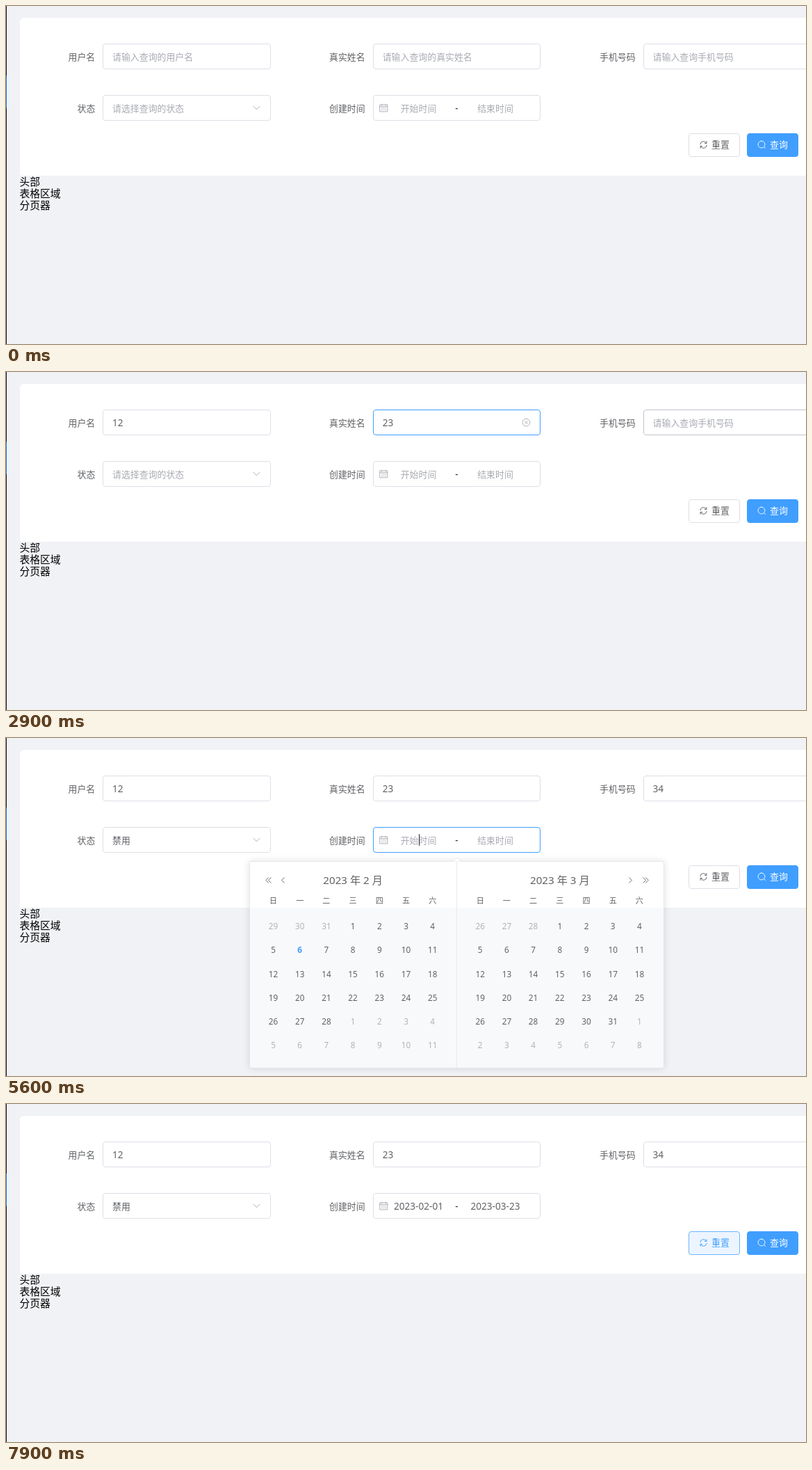
Animation, 1151 px wide and 486 px high, one loop 8 s. Source, as an HTML page:

```html
<!DOCTYPE html>
<html lang="zh-CN">
<head>
<meta charset="utf-8">
<title>查询表单</title>
<style>
  html, body { margin: 0; width: 100%; height: 100%; overflow: hidden; }
  #stage {
    position: relative; width: 1151px; height: 486px; overflow: hidden; background: #f0f2f5;
    font: 12.92px/1.3 "Noto Sans", "Noto Sans CJK SC", "Noto Sans CJK", sans-serif; color: #606266;
  }
  #stage div, #stage span, #stage svg { position: absolute; box-sizing: border-box; }
  span { white-space: pre; transform: translateY(-50%); }
  span.mid { transform: translate(-50%, -50%); }
  svg { fill: none; stroke: currentColor; stroke-linecap: round; stroke-linejoin: round; overflow: visible; }
  .card { background: #fff; border-radius: 6px 0 0 3px; }
  .edge { background: #10101f; }
  .mark { background: #1472e0; }
  .field { border: 1px solid #dcdfe6; border-radius: 4px; background: #fff; }
  .hint { color: #a8abb2; }
  .num { font-size: 13.6px; }
  .plain { font-size: 14.77px; color: #000; }
  .caret { width: 1px; height: 17px; background: #303133; }
  .button {
    display: flex; align-items: center; justify-content: center; gap: 5.5px;
    border: 1px solid #dcdfe6; border-radius: 4px; background: #fff; font-weight: 500;
  }
  #stage .button > * { position: static; transform: none; }
  .primary { background: #409eff; border-color: #409eff; color: #fff; }
  .popup {
    border-radius: 3px; transform-origin: 50% 0;
    box-shadow: 0 0 0 1px #e4e7ed, 0 0 11px 1px rgba(0, 0, 0, .12);
  }
  .tip {
    width: 9px; height: 9px; background: #fff; border: 1px solid #e4e7ed;
    transform: rotate(45deg); clip-path: polygon(0 0, 100% 0, 0 100%);
  }
  .menu { background: linear-gradient(#fff 5px, #f9f9f9 5px, #f7f7f7); }
  .picker { background: rgba(255, 255, 255, .55); }
  .line { background: #e9ebf0; }
  .title { font-size: 15.2px; }
  .day { font-size: 11.8px; }
  .week { font-size: 11.1px; }
  .other { color: #b0b3b9; }
  .today { color: #409eff; font-weight: 700; }
  .range { background: #f1f5fc; }
  .dot {
    width: 22px; height: 22px; border-radius: 50%; background: #409eff; color: #fff;
    text-align: center; line-height: 22px; transform: translate(-50%, -50%);
  }
</style>
</head>
<body>
<div id="stage"></div>
<script>
const LOOP = 8000;
const GREY = '#dcdfe6', HOVER = '#c0c4cc', BLUE = '#409eff';
const stage = document.getElementById('stage');

function add(tag, cls, x, y, parent = stage) {
  const el = document.createElement(tag);
  el.className = cls;
  el.style.left = x + 'px';
  el.style.top = y + 'px';
  return parent.appendChild(el);
}

function box(cls, x, y, w, h, parent) {
  const el = add('div', cls, x, y, parent);
  el.style.width = w + 'px';
  el.style.height = h + 'px';
  return el;
}

// y is the middle of the line
function text(str, x, y, cls = '', parent) {
  const el = add('span', cls, x, y, parent);
  el.textContent = str;
  return el;
}

// Icons are drawn on a 14-unit square centred on x, y
function icon(path, x, y, color = '#a8abb2', parent = stage) {
  const svg = document.createElementNS('http://www.w3.org/2000/svg', 'svg');
  svg.setAttribute('viewBox', '0 0 14 14');
  svg.setAttribute('width', 13);
  svg.setAttribute('height', 13);
  svg.style.cssText = `left:${x - 6.5}px;top:${y - 6.5}px;color:${color}`;
  svg.innerHTML = `<path d="${path}"/>`;
  return parent.appendChild(svg);
}

// steps maps a time in ms to the value held from then on
function play(el, prop, steps) {
  const frames = Object.entries(steps).map(([t, v]) =>
    ({ offset: t / LOOP, [prop]: v, easing: 'step-end' }));
  frames.push({ ...frames[frames.length - 1], offset: 1 });
  el.animate(frames, { duration: LOOP, iterations: Infinity });
}

function show(el, ...spans) {
  const steps = { 0: 0 };
  for (const [from, to = LOOP] of spans) {
    steps[from] = 1;
    if (to < LOOP) steps[to] = 0;
  }
  play(el, 'opacity', steps);
}

function zoom(el, steps) {
  const scaled = {};
  for (const t in steps) scaled[t] = `scaleY(${steps[t]})`;
  play(el, 'transform', scaled);
  play(el, 'opacity', steps);
}

const caret = (x, y, ...spans) => show(box('caret', x, y - 8.5, 1, 17), ...spans);

const ICON = {
  clear: 'M7 1.2a5.8 5.8 0 1 0 .01 0M5 5l4 4M9 5l-4 4',
  chevron: 'M2 4.5l5 5 5-5',
  calendar: 'M1.2 2.2h11.6v10.6H1.2zM1.2 5h11.6M4 1v2M10 1v2M3.6 7.3h1M6.5 7.3h1M9.4 7.3h1M3.6 10h1M6.5 10h1M9.4 10h1',
  refresh: 'M2 6.2A5 5 0 0 1 11.5 4.6M11.8 1.8v3H9M12 7.8A5 5 0 0 1 2.5 9.4M2.2 12.2v-3H5',
  search: 'M6.4 1.2a5.3 5.3 0 1 0 .01 0M10.2 10.3l2.2 2.3',
  left: 'M9 3L5 7l4 4',
  right: 'M5 3l4 4-4 4',
  first: 'M7 3L3 7l4 4M11 3L7 7l4 4',
  last: 'M3 3l4 4-4 4M7 3l4 4-4 4'
};

function field(label, labelX, x, y, borders) {
  text(label, labelX, y + 18.5);
  const el = box('field', x, y, 241.5, 37);
  play(el, 'borderColor', { 0: GREY, ...borders });
}

function input(label, labelX, x, hint, value, [focus, first, second, blink, blur], borders) {
  field(label, labelX, x, 54, borders);
  const tx = x + 14, ty = 72.7;
  show(text(hint, tx, ty, 'hint'), [0, first]);
  show(text(value[0], tx, ty, 'num'), [first, second]);
  show(text(value, tx, ty, 'num'), [second]);
  show(icon(ICON.clear, x + 221, 72.5), [first, blur]);
  if (focus[1]) caret(tx, 73, focus);
  caret(tx + 8, 73, [first, second]);
  caret(tx + 15.6, 73, [second, blink]);
}

// Returns the popup and a layer inside it that uses stage coordinates
function popup(cls, x, y, w, h, tipX) {
  const el = box('popup ' + cls, x, y, w, h);
  const layer = box('', -x, -y, 0, 0, el);
  add('div', 'tip', tipX - 4.5, y - 5, layer);
  return [el, layer];
}

// Page frame
box('edge', 0, 0, 1.4, 486);
box('mark', 0, 100, 1.4, 47);
box('card', 20, 17, 1140, 227);
['头部', '表格区域', '分页器'].forEach((s, i) => text(s, 19.5, 253 + 16.8 * i, 'plain'));

// Text inputs
input('用户名', 89.5, 139, '请输入查询的用户名', '12', [[700, 1100], 1300, 1500, 2000, 2100],
  { 500: HOVER, 600: BLUE, 2100: GREY });
input('真实姓名', 465, 527.7, '请输入查询的真实姓名', '23', [[2200, 2300], 2300, 2400, 2900, 3100],
  { 2000: HOVER, 2200: BLUE, 3100: GREY });
input('手机号码', 854, 916.6, '请输入查询手机号码', '34', [[3200, 3300], 3300, 3400, 3900, 4300],
  { 2900: HOVER, 3100: BLUE, 4300: GREY });

// Status select
field('状态', 102.5, 139, 128, { 4000: HOVER, 4300: BLUE, 5500: GREY });
show(text('请选择查询的状态', 153, 146.5, 'hint'), [0, 5000]);
show(text('禁用', 153, 146.5), [5000]);
play(icon(ICON.chevron, 360, 146.5), 'transform',
  { 0: 'none', 4300: 'scaleY(.2)', 4400: 'scaleY(-.8)', 4500: 'scaleY(-1)', 5000: 'scaleY(-.4)', 5100: 'none' });

// Date range
field('创建时间', 465, 527.7, 128, { 5300: HOVER, 5500: BLUE, 6900: GREY });
icon(ICON.calendar, 543.5, 146.3);
text('-', 648.5, 146.5, 'mid num').style.color = '#303133';
[['开始时间', '2023-02-01', 593.5], ['结束时间', '2023-03-23', 704]].forEach(([hint, date, x]) => {
  show(text(hint, x, 146.5, 'mid hint'), [0, 6500]);
  show(text(date, x, 146.5, 'mid num'), [6500]);
});
caret(593.5, 146.5, [5500, 6000]);
caret(629, 146.5, [6500, 7200], [7700, 7900]);

// Buttons
function button(label, path, x, cls) {
  const el = box('button ' + cls, x, 183, 73.5, 33.5);
  icon(path, 0, 0, 'inherit', el);
  text(label, 0, 0, '', el);
  return el;
}
const reset = button('重置', ICON.refresh, 982, '');
play(reset, 'backgroundColor', { 0: '#fff', 7700: '#ecf5ff' });
play(reset, 'color', { 0: '#606266', 7700: BLUE });
play(reset, 'borderColor', { 0: GREY, 7700: '#c6e2ff', 7900: '#6cb4ff' });

const query = button('查询', ICON.search, 1066, 'primary');
for (const prop of ['backgroundColor', 'borderColor'])
  play(query, prop, { 0: BLUE, 7200: '#5cacff', 7300: '#79bbff', 7600: '#5cacff', 7700: BLUE });

// Status menu
const [menu, menuLayer] = popup('menu', 140, 177, 242, 73, 259);
show(box('range', 140, 214.5, 242, 31, menuLayer), [4900, 5100]);
text('启用', 158, 198.7, '', menuLayer);
play(text('禁用', 158, 229.7, '', menuLayer), 'color', { 0: '#606266', 5000: BLUE });
zoom(menu, { 0: 0, 4300: .5, 4400: .85, 4500: .96, 4600: 1, 5000: .6, 5100: 0 });

// Date picker
const [picker, pickerLayer] = popup('picker', 351, 177.5, 595, 295.5, 648);
box('line', 647.7, 177.5, 1, 295.5, pickerLayer);
[['first', 377], ['left', 398.5], ['right', 898], ['last', 920]].forEach(([name, x]) =>
  icon(ICON[name], x, 204.3, '#606266', pickerLayer));

function month(title, x, before, length, from, to, pick, pickAt) {
  const cell = 38.2;
  text(title, x + 3 * cell, 204.3, 'mid title', pickerLayer);
  [...'日一二三四五六'].forEach((d, i) => text(d, x + i * cell, 233.7, 'mid week', pickerLayer));
  for (let i = 0; i < 42; i++) {
    const n = i - 2;
    const cx = x + i % 7 * cell, cy = 270.7 + 34.2 * Math.floor(i / 7);
    const inside = n >= 1 && n <= length;
    const today = inside && length === 28 && n === 6;
    if (n >= from && n <= to) {
      const start = n === pick && pick === from, end = n === pick && pick === to;
      const left = cx - (start ? 11 : cell / 2), right = cx + (end ? 11 : cell / 2);
      const band = box('range', left, cy - 13.3, right - left, 26.6, pickerLayer);
      if (start) band.style.borderRadius = '13px 0 0 13px';
      if (end) band.style.borderRadius = '0 13px 13px 0';
      show(band, [6400]);
    }
    const day = n < 1 ? n + before : inside ? n : n - length;
    text(day, cx, cy, 'mid day' + (today ? ' today' : inside ? '' : ' other'), pickerLayer);
    if (n === pick) {
      const dot = add('div', 'dot day', cx, cy, pickerLayer);
      dot.textContent = n;
      show(dot, [pickAt]);
    }
  }
}
month('2023 年 2 月', 384.5, 31, 28, 1, 28, 1, 6200);
month('2023 年 3 月', 682.2, 28, 31, 1, 23, 23, 6400);
zoom(picker, { 0: 0, 5500: .6, 5600: 1, 6700: .784, 6800: .35, 6900: 0 });
</script>
</body>
</html>
```
